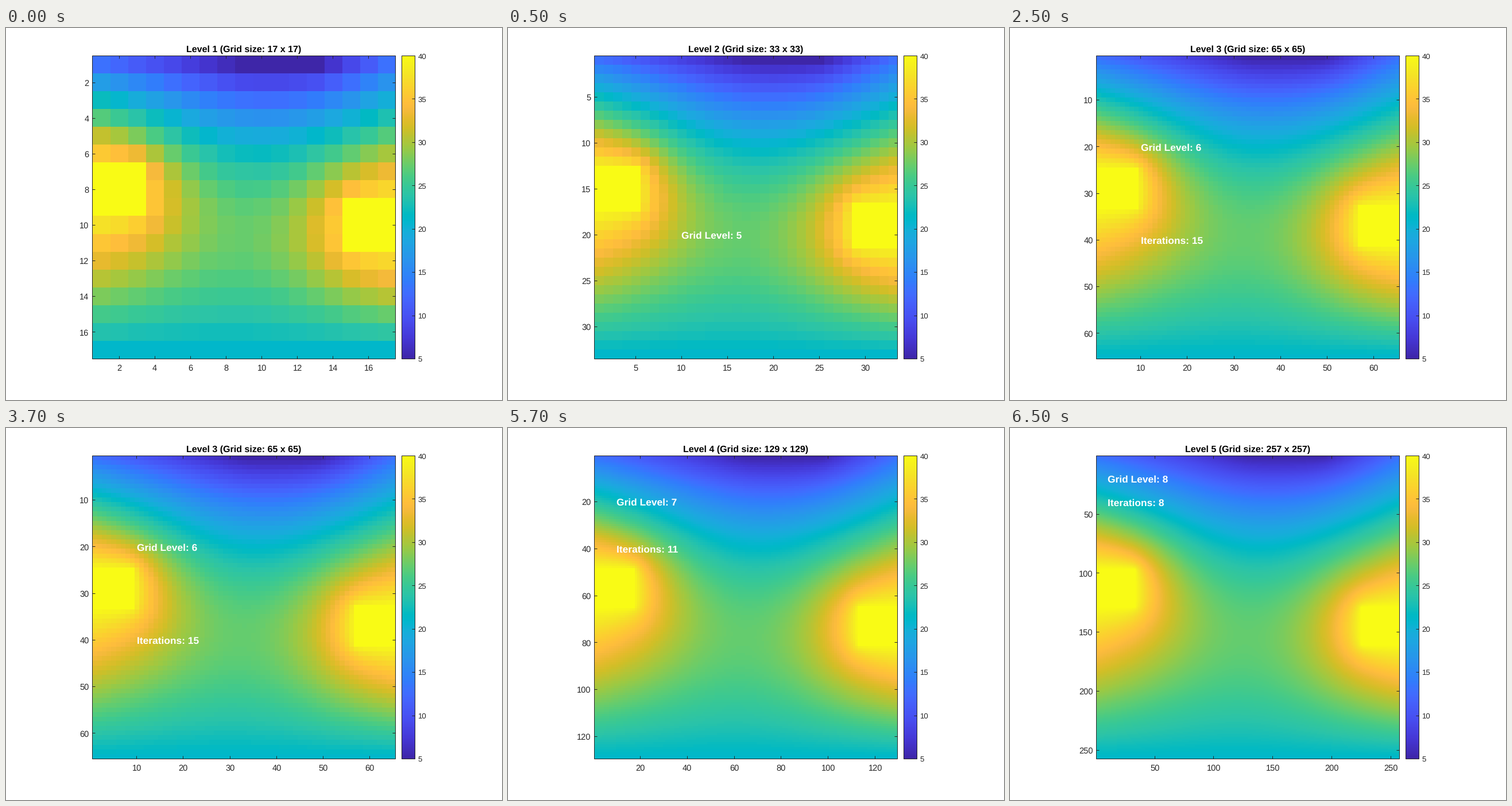
These frames come from a looping animation (864 by 648 pixels, 8000 ms). A matplotlib script:

```python
import numpy as np
import matplotlib.pyplot as plt
from matplotlib.animation import FuncAnimation
from matplotlib.colors import LinearSegmentedColormap
from matplotlib.patches import Rectangle

WIDTH, HEIGHT, DPI = 864, 648, 96
LEFT, RIGHT, TOP, BOTTOM = 150.5, 678.5, 48.5, 576.5
BAR_LEFT, BAR_RIGHT = 689.5, 712.5
T_MIN, T_MAX = 5, 40
TICK_STEPS = [2, 5, 10, 20, 50]
TICK_LEN = 5
INK = "#262626"

plt.rcParams["font.family"] = "Liberation Sans"
plt.rcParams["text.hinting"] = "none"

# Blue-green-yellow colour stops, positions out of 63
STOPS = [
    (0, "#3e26a8"), (4, "#4537d5"), (8, "#484df0"), (12, "#4563fd"),
    (14, "#3e6fff"), (16, "#327cfc"), (18, "#2e87f7"), (20, "#2b91ef"),
    (22, "#259be8"), (25, "#1ca9df"), (27, "#12b1d6"), (28, "#08b5d0"),
    (29, "#01b8ca"), (30, "#02bac3"), (32, "#19bfb6"), (34, "#2cc4a7"),
    (36, "#37c897"), (38, "#4acb84"), (40, "#64cd6f"), (44, "#9dc943"),
    (48, "#d1bf27"), (50, "#e6bb2d"), (52, "#f8ba3d"), (53, "#febe3c"),
    (54, "#fec338"), (56, "#fccf30"), (59, "#f5e327"), (61, "#f6ef20"),
    (63, "#f9fb15"),
]
CMAP = LinearSegmentedColormap.from_list(
    "heat", [(pos / 63, color) for pos, color in STOPS], N=256)


def solve_room(n):
    """Steady heat in a room: fixed wall temperatures and two heaters."""
    q = n // 16
    s = np.linspace(0, 1, n + 1)
    u = np.full((n + 1, n + 1), 21.0)
    u[0] = np.interp(s, [0, 0.5, 0.75, 1], [13, 5, 5, 13])
    u[:, 0] = np.interp(s, [0, 6 / 16, 8 / 16, 1], [13, 40, 40, 21])
    u[:, -1] = np.interp(s, [0, 8 / 16, 10 / 16, 1], [13, 40, 40, 21])

    free = np.ones(u.shape, bool)
    heaters = [(slice(6 * q, 8 * q + 1), slice(0, 2 * q + 1)),
               (slice(8 * q, 10 * q + 1), slice(14 * q, n + 1))]
    for area in heaters:
        u[area] = 40
        free[area] = False

    rows, cols = np.indices(u.shape)
    omega = 2 / (1 + np.sin(np.pi / n))
    inner = u[1:-1, 1:-1]
    weights = [(omega * (free & ((rows + cols) % 2 == parity)))[1:-1, 1:-1]
               for parity in (0, 1)]
    for _ in range(3 * n + 60):
        for weight in weights:
            mean = (u[:-2, 1:-1] + u[2:, 1:-1] + u[1:-1, :-2] + u[1:-1, 2:]) / 4
            inner += weight * (mean - inner)
    return u


fields = [solve_room(16 * 2 ** level) for level in range(5)]

fig = plt.figure(figsize=(WIDTH / DPI, HEIGHT / DPI), dpi=DPI, facecolor="white")
ax = fig.add_axes([0, 0, 1, 1])


def crisp(v):
    """Centre of the pixel that holds v."""
    return np.floor(v) + 0.5


def h_tick(x, y, length):
    ax.plot([x, x + length], [crisp(y)] * 2, color=INK, lw=0.75,
            solid_capstyle="butt", snap=False)


def v_tick(x, y, length):
    ax.plot([crisp(x)] * 2, [y, y + length], color=INK, lw=0.75,
            solid_capstyle="butt", snap=False)


def label(x, y, text, size=11, color=INK, **kw):
    ax.text(x, y, text, size=size, color=color, va="baseline", **kw)


def panel(data, x0, x1):
    ax.imshow(data, cmap=CMAP, vmin=T_MIN, vmax=T_MAX, interpolation="nearest",
              extent=(x0, x1, BOTTOM, TOP), aspect="auto")
    ax.add_patch(Rectangle((x0, TOP), x1 - x0, BOTTOM - TOP, fill=False,
                           ec=INK, lw=0.75, zorder=3, snap=False))


def draw_colorbar():
    panel(np.linspace(T_MAX, T_MIN, 256)[:, None], BAR_LEFT, BAR_RIGHT)
    for value in range(T_MIN, T_MAX + 1, 5):
        y = np.interp(value, [T_MIN, T_MAX], [BOTTOM, TOP])
        h_tick(BAR_RIGHT, y, -TICK_LEN)
        label(717.5, y + 5, str(value), size=9.9)


def draw(frame):
    level = (frame + 3) // 4
    size = fields[level].shape[0]
    cell = (RIGHT - LEFT) / size

    ax.clear()
    ax.axis("off")
    panel(fields[level], LEFT, RIGHT)
    draw_colorbar()

    step = TICK_STEPS[level]
    for value in range(step, size + 1, step):
        x = LEFT + (value - 0.5) * cell
        y = TOP + (value - 0.5) * cell
        v_tick(x, BOTTOM, -TICK_LEN)
        v_tick(x, TOP, TICK_LEN)
        h_tick(LEFT, y, TICK_LEN)
        h_tick(RIGHT, y, -TICK_LEN)
        label(x, 597.3, str(value), ha="center")
        label(144.5, y + 5.6, str(value), ha="right")

    label(414.5, 41.8, f"Level {level + 1} (Grid size: {size} x {size})",
          size=12, color="black", weight="bold", ha="center")

    notes = [(20, f"Grid Level: {level + 4}")]
    if level >= 2:
        notes.append((40, f"Iterations: {[15, 11, 8][level - 2]}"))
    for row, text in notes:
        if row < size:
            label(LEFT + 9.5 * cell, TOP + (row - 0.5) * cell + 6.5, text,
                  size=13, color="white", weight="bold")

    ax.set_xlim(0, WIDTH)
    ax.set_ylim(HEIGHT, 0)
    return []


anim = FuncAnimation(fig, draw, frames=16, interval=500, repeat=True,
                     repeat_delay=0, init_func=lambda: [])
plt.show()
```
